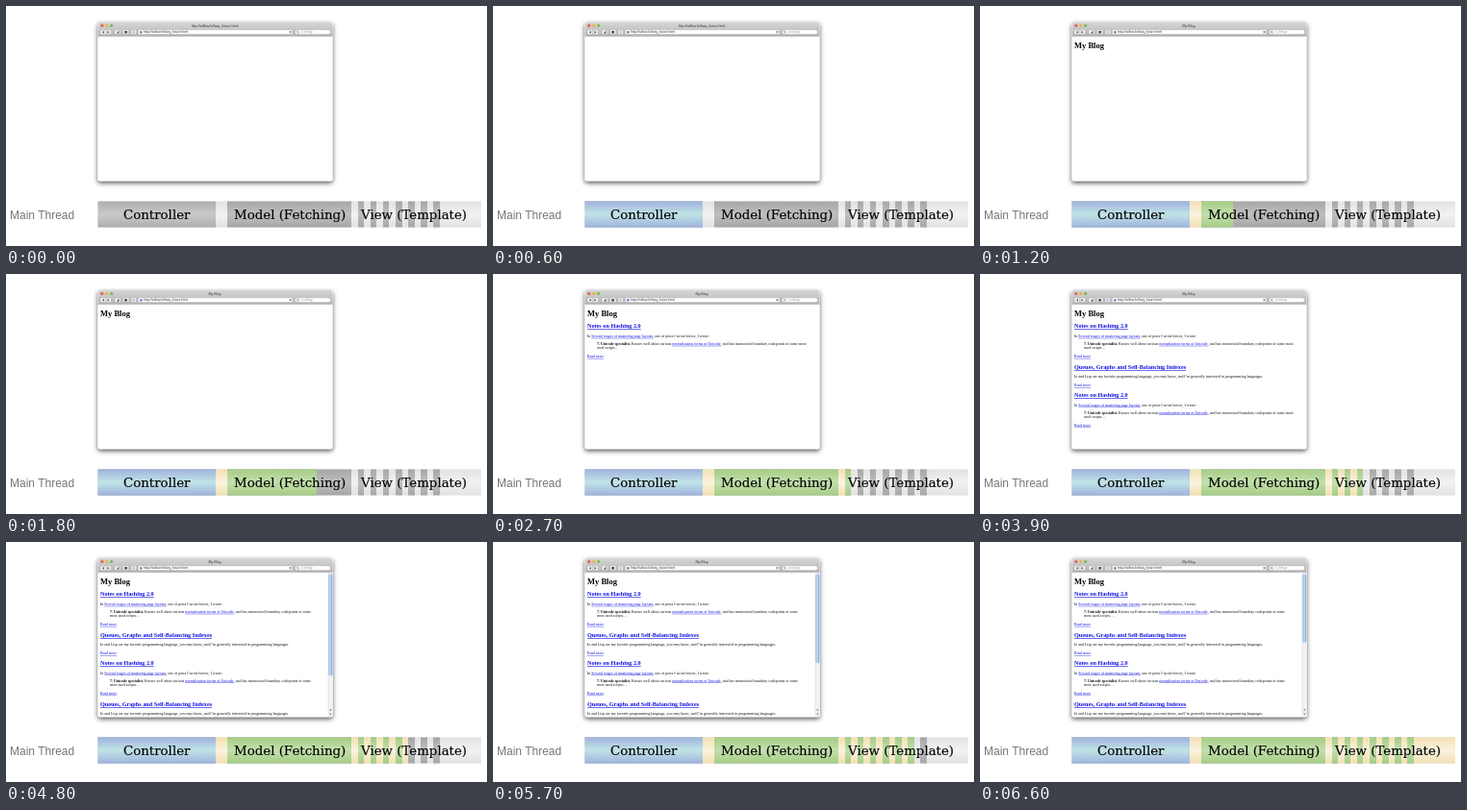
These frames come from a looping animation (500x250 px, 8000 ms). An HTML page:

```html
<!DOCTYPE html>
<html lang="en">
<head>
<meta charset="utf-8">
<title>Streaming a page</title>
<style>
  html, body { margin: 0; width: 100%; height: 100%; overflow: hidden; background: #fff; }
  svg { display: block; width: 500px; height: 250px; }
  .label { font: 13.35px "DejaVu Serif", serif; fill: #000; stroke: #000; stroke-width: .15; }
  .lane { font: 12px "Liberation Sans", sans-serif; fill: #777; }
  .ui { font: 3.6px "Liberation Sans", sans-serif; fill: #333; }
  .page { font: 3.95px "Liberation Serif", serif; fill: #111; }
  .page .h1 { font-size: 8.5px; font-weight: bold; fill: #000; }
  .page .h2 { font-size: 6.2px; font-weight: bold; }
  .page .b { font-weight: bold; }
  .page .a { fill: #1414e0; text-decoration: underline; }
</style>
</head>
<body>
<svg viewBox="0 0 500 250" xmlns="http://www.w3.org/2000/svg">
  <defs id="defs">
    <filter id="shadow" x="-10%" y="-10%" width="120%" height="125%">
      <feDropShadow dx="0" dy="2" stdDeviation="2.8" flood-color="#000" flood-opacity=".7"/>
    </filter>
    <linearGradient id="chrome" x2="0" y2="1">
      <stop stop-color="#d6d6d6"/><stop offset="1" stop-color="#b6b6b6"/>
    </linearGradient>
    <linearGradient id="thumbFill">
      <stop stop-color="#7fa9dc"/><stop offset=".4" stop-color="#cfe3f7"/><stop offset="1" stop-color="#6d9bd6"/>
    </linearGradient>
    <clipPath id="view"><rect x="96" y="32" width="243" height="150"/></clipPath>
    <clipPath id="done"><rect id="fill" x="95" y="200" height="35"/></clipPath>
  </defs>

  <rect x="95.5" y="17" width="244" height="165.3" rx="2" fill="#fff" filter="url(#shadow)"/>
  <path d="M95.5 31.5V19q0-2 2-2h240q2 0 2 2v12.5z" fill="url(#chrome)"/>
  <path d="M95.5 31.3h244" stroke="#8a8a8a" stroke-width=".4"/>
  <circle cx="99.8" cy="20.4" r="1.7" fill="#e2685c"/>
  <circle cx="104.7" cy="20.4" r="1.7" fill="#e5b350"/>
  <circle cx="109.6" cy="20.4" r="1.7" fill="#84b960"/>
  <text id="title" class="ui" x="217" y="22.2" text-anchor="middle"></text>
  <g fill="#f0f0f0" stroke="#8c8c8c" stroke-width=".3">
    <rect x="98" y="24.8" width="11.5" height="4.8" rx="1"/>
    <rect x="113" y="24.8" width="6.3" height="4.8" rx="1"/>
    <rect x="121.5" y="24.8" width="6.3" height="4.8" rx="1"/>
    <rect x="130" y="24.8" width="5.5" height="4.8" rx="1"/>
    <rect x="137.5" y="24.8" width="160.5" height="4.8" rx=".6" fill="#fff"/>
    <rect x="300.5" y="24.8" width="37" height="4.8" rx="2.4" fill="#fff"/>
  </g>
  <path d="M102 26l-2 1.2 2 1.2zM105.5 26l2 1.2-2 1.2zM115 28.6l2.5-3v3zM123.3 26h2.6v2.4h-2.6z" fill="#444"/>
  <path d="M103.8 24.8v4.8M131.2 27.2h3M132.7 25.7v3" stroke="#777" stroke-width=".4"/>
  <circle cx="140.4" cy="27.2" r="1.3" fill="#5a83bd"/>
  <path d="M294.5 26h2.2v2.2h-2.2z" fill="#999"/>
  <circle cx="303.3" cy="27" r=".9" fill="none" stroke="#666" stroke-width=".5"/>
  <path d="M304 27.7l.9.9" stroke="#666" stroke-width=".5"/>
  <text class="ui" x="143" y="28.4" style="font-size:3.4px">http://willow.kr/lazy_future.html</text>
  <text class="ui" x="307" y="28.4" style="fill:#999">Lookup</text>

  <g id="page" class="page" clip-path="url(#view)"></g>
  <g id="scroll">
    <rect x="335" y="32" width="4.5" height="150" fill="#f3f3f3"/>
    <path d="M335 32v150" stroke="#c4c4c4" stroke-width=".4"/>
    <rect id="thumb" x="335.5" y="33" width="3.8" rx="1.9" fill="url(#thumbFill)"/>
    <path d="M336.1 175.4l1.3-2 1.3 2zM336.1 178.6l1.3 2 1.3-2z" fill="#888"/>
  </g>

  <text class="lane" x="4" y="222">Main Thread</text>
  <g id="idle"></g>
  <g id="busy" clip-path="url(#done)"></g>
  <text class="label" x="122" y="222">Controller</text>
  <text class="label" x="237" y="222">Model (Fetching)</text>
  <text class="label" x="369" y="222">View (Template)</text>
</svg>
<script>
const LOOP = 8000, STEP = 300, LAST = 22;
const $ = id => document.getElementById(id);
const SVG_NS = "http://www.w3.org/2000/svg";

// kind: [edge, middle]
const TONES = {
  blue: ["#9fb2dd", "#c0e4e6"], blueOff: ["#adadad", "#cacaca"],
  green: ["#a5cc86", "#c3e0ac"], greenOff: ["#a6a6a6", "#bfbfbf"],
  cream: ["#f2e0b4", "#fbf3df"], creamOff: ["#e2e2e2", "#f2f2f2"]
};
for (const [id, [edge, mid]] of Object.entries(TONES)) {
  const g = document.createElementNS(SVG_NS, "linearGradient");
  g.id = id;
  g.setAttribute("x2", 0);
  g.setAttribute("y2", 1);
  g.innerHTML = [[0, edge], [.5, mid], [1, edge]]
    .map(([o, c]) => `<stop offset="${o}" stop-color="${c}"/>`).join("");
  $("defs").append(g);
}

// Right edge of the finished part after each step
const STRIPE = 92 / 14;
const ends = [95.5, 158, 218, 230, 263, 294, 323];
for (let i = 0; i <= 14; i++) ends.push(Math.round(359 + i * STRIPE));
ends.push(494);

const bars = [["blue", ends[0], 218], ["cream", 218, 230], ["green", 230, 359]];
for (let s = 8; s <= LAST; s++) bars.push([s % 2 ? "green" : "cream", ends[s - 1], ends[s]]);
const drawBars = off => bars.map(([tone, a, b]) =>
  `<rect x="${a}" y="203.4" width="${b - a}" height="27.2" fill="url(#${tone}${off})"/>`).join("");
$("idle").innerHTML = drawBars("Off");
$("busy").innerHTML = drawBars("");

const line = (x, y, body, cls = "") => `<text x="${x}" y="${y}" class="${cls}">${body}</text>`;
const link = s => `<tspan class="a">${s}</tspan>`;
const LONG = 42.8, SHORT = 29;

function longPost(y, narrow) {
  const [head, tail] = narrow ? ["some", "most used"] : ["some most", "used"];
  return line(98, y, "Notes on Hashing 2.0", "h2 a") +
    line(98, y + 9.4, `In ${link("Several stages of mastering page layouts")}, one of posts I wrote before, I wrote:`) +
    line(108, y + 17.4, `<tspan class="b">7. Unicode specialist.</tspan> Knows well about various ` +
      `${link("normalization forms of Unicode")}, and has memorized boundary codepoints of ${head}`) +
    line(108, y + 22, `${tail} scripts…`) +
    line(98, y + 30.5, "Read more", "a");
}

function shortPost(y) {
  return line(98, y, "Queues, Graphs and Self-Balancing Indexes", "h2 a") +
    line(98, y + 9, "Io and Lisp are my favorite programming language, you may know, " +
      "and I’m generally interested in programming languages.") +
    line(98, y + 17.8, "Read more", "a");
}

function draw(step) {
  const started = step >= 3;
  const posts = Math.max(0, Math.floor((step - 6) / 2));
  const scrolls = posts >= 4;
  let html = started ? line(98, 44, "My Blog", "h1") : "";
  let y = 56.4;
  for (let i = 0; i < posts; i++) {
    html += i % 2 ? shortPost(y) : longPost(y, scrolls);
    y += i % 2 ? SHORT : LONG;
  }
  $("page").innerHTML = html;
  $("title").textContent = started ? "My Blog" : "http://willow.kr/lazy_future.html";
  $("scroll").style.display = scrolls ? "" : "none";
  $("thumb").setAttribute("height", Math.min(138, 148 * 150 / (y - 34.4)));
  $("fill").setAttribute("width", ends[step] - 95);
}

let shown = -1;
function tick() {
  const step = Math.min(LAST, Math.floor(performance.now() % LOOP / STEP));
  if (step !== shown) draw(shown = step);
  requestAnimationFrame(tick);
}
tick();
</script>
</body>
</html>
```
